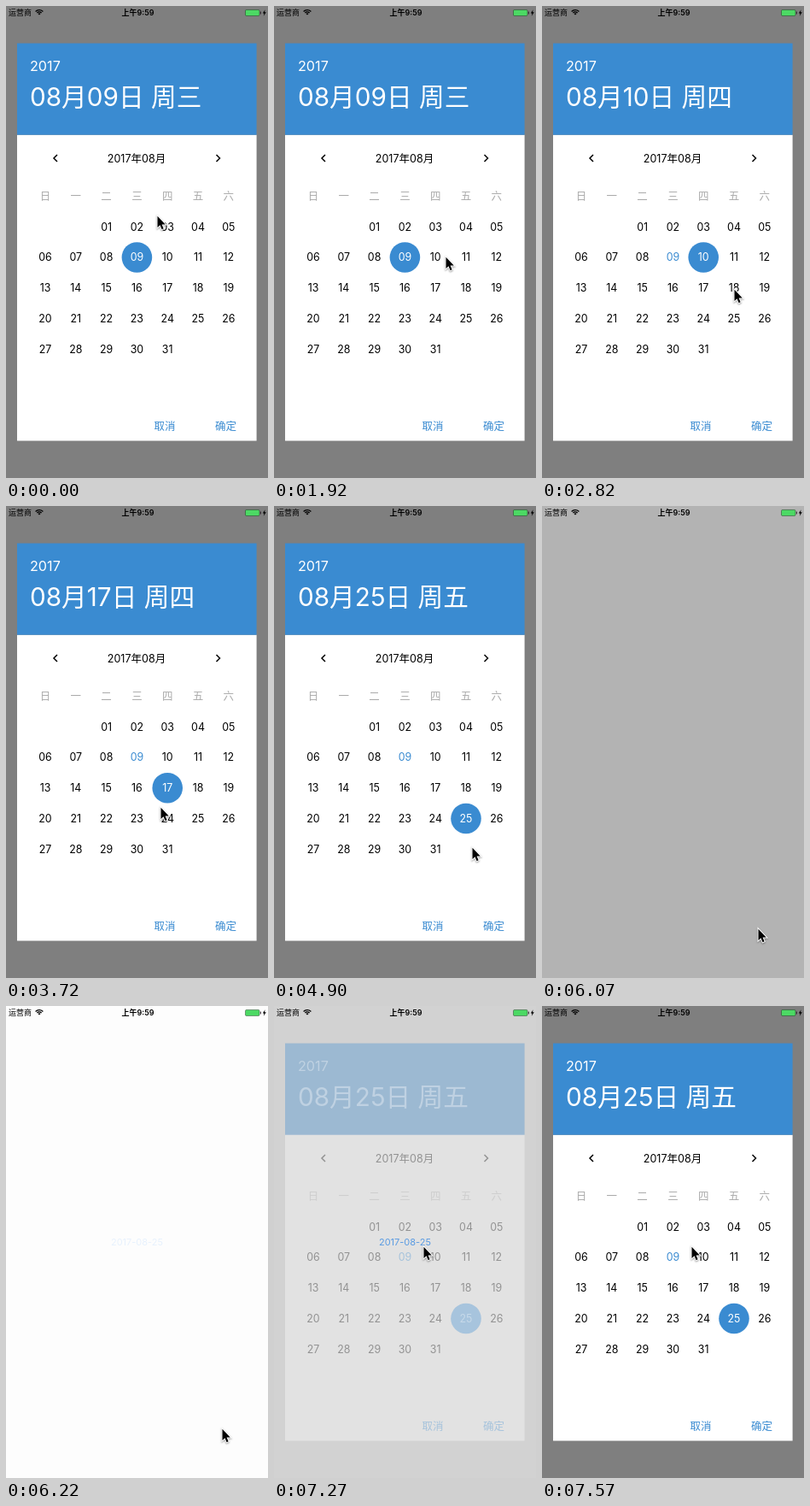
Animation of 307x552 px, one loop 8000 ms. Source, as an HTML page with a canvas:

```html
<!DOCTYPE html>
<html lang="zh-CN">
<head>
<meta charset="utf-8">
<style>
  html, body { margin: 0; height: 100%; overflow: hidden; background: #fff; }
  canvas { display: block; width: 307px; height: 552px; }
</style>
</head>
<body>
<canvas></canvas>
<script>
const W = 307, H = 552, LOOP = 8000, TICKS = 54;
const BLUE = '#3a8bd1';
const FONT = 'Inter, "Noto Sans CJK SC", "Noto Sans CJK", sans-serif';
const WEEK = '日一二三四五六';
const FIRST_WEEKDAY = 2, TODAY = 9;
const CONFIRM = 41, REOPEN = 48;

// Where the pointer rests; a day is clicked as the pointer leaves it.
const STOPS = [
  { arrive: 0, leave: 0, x: 177, y: 245, day: TODAY },
  { arrive: 3, leave: 3, x: 196, y: 178 },
  { arrive: 7, leave: 10, x: 190, y: 295 },
  { arrive: 13, leave: 15, x: 201, y: 293, day: 10 },
  { arrive: 19, leave: 20, x: 225, y: 331, day: 18 },
  { arrive: 22, leave: 24, x: 187, y: 331, day: 17 },
  { arrive: 25, leave: 27, x: 181, y: 352, day: 24 },
  { arrive: 30, leave: 31, x: 223, y: 364, day: 25 },
  { arrive: 33, leave: 34, x: 232, y: 399 },
  { arrive: 39, leave: 42, x: 253, y: 494 },
  { arrive: REOPEN, leave: TICKS, x: 175, y: 281 }
];

const canvas = document.querySelector('canvas');
const ctx = canvas.getContext('2d');
const scale = window.devicePixelRatio || 1;
canvas.width = W * scale;
canvas.height = H * scale;

const clamp = v => Math.max(0, Math.min(1, v));
const ease = f => f * f * (3 - 2 * f);

function text(str, x, y, size, color = '#000', align = 'center', weight = 400) {
  ctx.font = `${weight} ${size}px ${FONT}`;
  ctx.textAlign = align;
  ctx.fillStyle = color;
  ctx.fillText(str, x, y + size * 0.36);
}

function rect(x, y, w, h, color) {
  ctx.fillStyle = color;
  ctx.fillRect(x, y, w, h);
}

function trace(points, closed) {
  ctx.beginPath();
  points.forEach(([x, y]) => ctx.lineTo(x, y));
  if (closed) ctx.closePath();
}

function stroke(color, width) {
  ctx.strokeStyle = color;
  ctx.lineWidth = width;
  ctx.stroke();
}

function fill(color) {
  ctx.fillStyle = color;
  ctx.fill();
}

function chevron(x, y, dir) {
  trace([[x - 2 * dir, y - 4], [x + 2 * dir, y], [x - 2 * dir, y + 4]]);
  stroke('#000', 1.5);
}

function wifi(x, y) {
  const from = -Math.PI * 0.76, to = -Math.PI * 0.24;
  for (const r of [3.6, 6]) {
    ctx.beginPath();
    ctx.arc(x, y, r, from, to);
    stroke('#000', 1.3);
  }
  ctx.beginPath();
  ctx.moveTo(x, y);
  ctx.arc(x, y, 2.2, from, to);
  fill('#000');
}

function statusBar() {
  text('运营商', 3, 8, 9, '#000', 'left');
  text('上午9:59', 154.5, 8, 9, '#000', 'center', 600);
  wifi(39, 10.6);

  ctx.beginPath();
  ctx.roundRect(280.5, 4.5, 16.5, 7, 1.2);
  fill('#4cd964');
  stroke('rgba(0,0,0,.5)', 0.7);
  rect(297.8, 6.6, 1, 2.8, '#222');
  trace([[303.6, 4.2], [300.8, 8.4], [302.5, 8.4], [301.8, 11.8], [304.8, 7.2], [303, 7.2]], true);
  fill('#000');
}

function dialog(selected) {
  const pad = n => String(n).padStart(2, '0');
  const column = i => 46 + i * 35.8;
  const weekday = WEEK[(selected - 1 + FIRST_WEEKDAY) % 7];

  rect(13, 150.7, 280.6, 357.8, '#fff');
  rect(13, 43.6, 280.6, 107.1, BLUE);
  text('2017', 28, 70.5, 16.2, '#fff', 'left');
  text(`08月${pad(selected)}日 周${weekday}`, 28, 106, 29.7, '#fff', 'left');

  text('2017年08月', 153, 178, 12.5);
  chevron(58, 178, -1);
  chevron(248.5, 178, 1);
  [...WEEK].forEach((c, i) => text(c, column(i), 222, 12.5, '#aaa'));

  for (let day = 1; day <= 31; day++) {
    const cell = day - 1 + FIRST_WEEKDAY;
    const x = column(cell % 7), y = 258.2 + Math.floor(cell / 7) * 35.75;
    let color = day === TODAY ? BLUE : '#000';
    if (day === selected) {
      ctx.beginPath();
      ctx.arc(x, y, 17.8, 0, Math.PI * 2);
      fill(BLUE);
      color = '#fff';
    }
    text(pad(day), x, y, 12.4, color);
  }
  text('取消', 186, 491, 12.5, BLUE);
  text('确定', 257.5, 491, 12.5, BLUE);
}

function pointer(tick) {
  const i = STOPS.findLastIndex(s => s.arrive <= tick);
  const from = STOPS[i], to = STOPS[i + 1] || from;
  const f = to === from ? 0 : ease(clamp((tick - from.leave) / (to.arrive - from.leave)));
  ctx.save();
  ctx.translate(from.x + (to.x - from.x) * f, from.y + (to.y - from.y) * f);
  trace([[0.5, 0.8], [0.5, 14], [3.5, 11.2], [5.6, 16.2], [7.6, 15.3], [5.6, 10.4], [9.8, 10.4]], true);
  ctx.shadowColor = 'rgba(0,0,0,.4)';
  ctx.shadowBlur = 2 * scale;
  ctx.shadowOffsetY = scale;
  stroke('#fff', 2);
  ctx.shadowColor = 'transparent';
  fill('#000');
  ctx.restore();
}

function draw(now) {
  // The screen refreshes in even ticks.
  const tick = Math.floor((now % LOOP + 6) / LOOP * TICKS) % TICKS;
  const reopened = tick >= REOPEN;
  const shown = reopened
    ? ease(clamp((tick - REOPEN) / 2.5))
    : clamp(1 - (tick - CONFIRM + 0.7) / 1.73);
  const selected = STOPS.findLast(s => s.day && s.leave <= tick).day;

  ctx.setTransform(scale, 0, 0, scale, 0, 0);
  rect(0, 0, W, H, '#fff');
  ctx.globalAlpha = clamp((tick - CONFIRM - 0.9) / 1.1);
  text('2017-08-25', 153.5, 276, 11, '#007aff');
  ctx.globalAlpha = 1;
  rect(0, 0, W, H, `rgba(0,0,0,${shown / 2})`);
  if (tick < CONFIRM || reopened) {
    ctx.globalAlpha = shown;
    dialog(selected);
    ctx.globalAlpha = 1;
  }
  statusBar();
  pointer(tick);
}

const start = performance.now();
function loop() {
  draw(performance.now() - start);
  requestAnimationFrame(loop);
}
loop();
</script>
</body>
</html>
```
